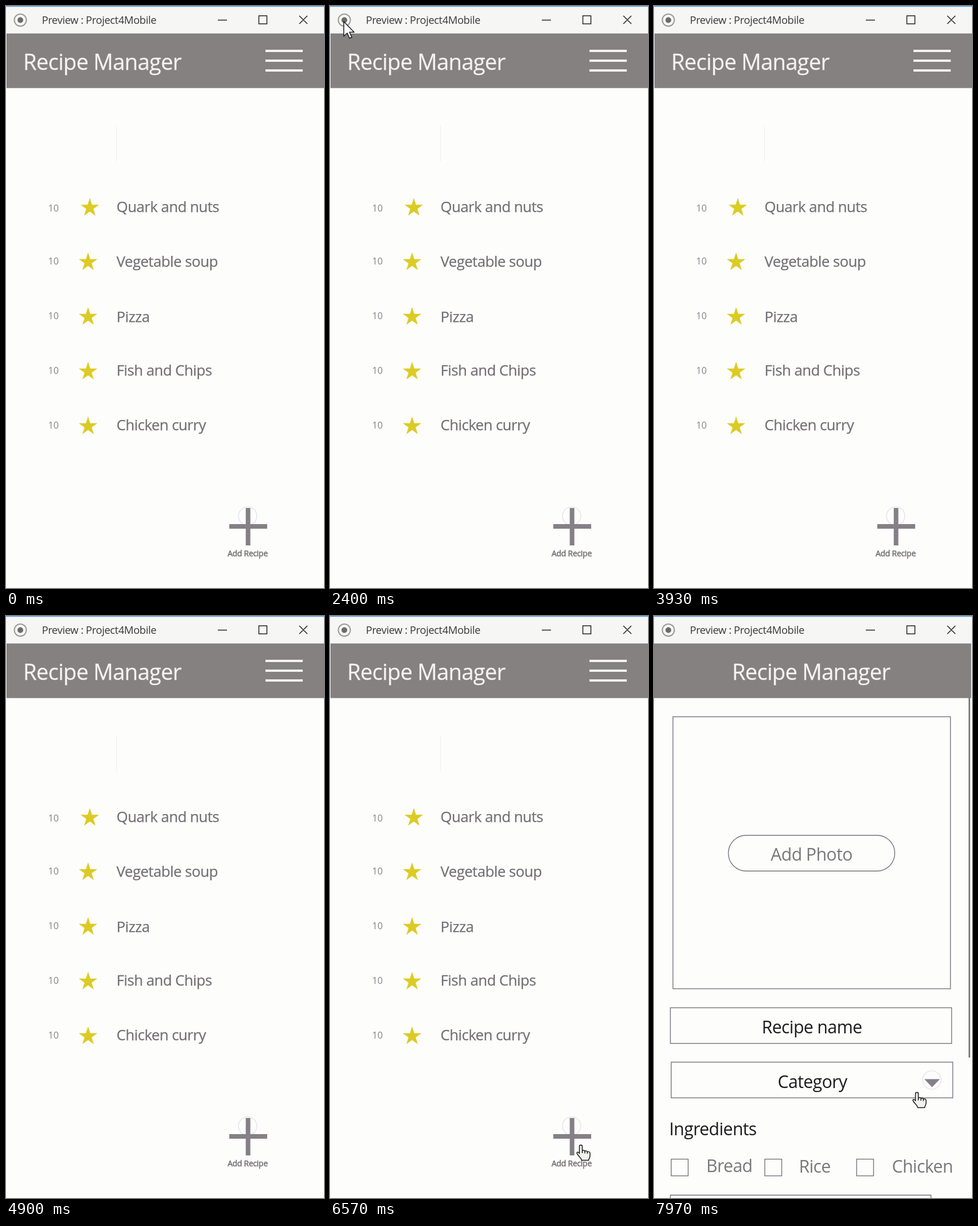
Write an HTML page that moves like this. It is 554 by 1011 pixels and loops after 8000 ms.

```html
<!DOCTYPE html>
<html lang="en">
<head>
<meta charset="utf-8">
<title>Recipe Manager</title>
<style>
  html, body { margin: 0; width: 100%; height: 100%; overflow: hidden; background: #fdfdfb; }
  svg { display: block; width: 554px; height: 1011px; }
  text { font-family: "Open Sans", "Noto Sans", sans-serif; letter-spacing: -.02em; }
  .title { font-size: 38.2px; fill: #f4f3f1; stroke: #f4f3f1; stroke-width: .3; }
  .item { font-size: 25.7px; fill: #737075; stroke: #737075; stroke-width: .25; }
  .count { font-size: 16px; fill: #858186; letter-spacing: 0; }
  .field { font-size: 30.2px; fill: #1c1b1e; }
  .gray { fill: #7a787b; }
  .mid { text-anchor: middle; }
  .bar { fill: #858180; stroke: #7a7683; stroke-width: 1; }
  .box { fill: none; stroke: #77757f; stroke-width: 1.4; }
  .ring { fill: none; stroke: #dfdfea; stroke-width: 1.2; }
  .control { fill: none; stroke: #262626; stroke-width: 1.5; }
</style>
</head>
<body>
<svg viewBox="0 0 554 1011">
  <rect width="554" height="1011" fill="#fdfdfb"/>

  <g id="form">
    <rect class="bar" x="-1" y="48" width="553" height="94"/>
    <rect class="box" x="33" y="175" width="483.5" height="472.5"/>
    <rect class="box" x="129.5" y="381" width="290" height="62" rx="31"/>
    <text class="field gray mid" x="274.5" y="425">Add Photo</text>
    <rect class="box" x="28.5" y="680.5" width="490" height="62"/>
    <text class="field mid" x="275" y="725">Recipe name</text>
    <rect class="box" x="30" y="775" width="490.5" height="62"/>
    <text class="field mid" x="276" y="820">Category</text>
    <circle class="ring" cx="484" cy="806" r="16"/>
    <path d="M471 804.5H498L484.5 818.5Z" fill="#84808a"/>
    <text class="field" x="26.5" y="902">Ingredients</text>
    <g id="checks"></g>
    <path class="box" d="M28.5 1011V1006H482.5V1011"/>
  </g>

  <g id="list">
    <rect class="bar" x="1.5" y="48" width="554" height="94"/>
    <path d="M452 78H517M452 95H517M452 112H517" stroke="#f4f3f1" stroke-width="4"/>
    <path d="M192.5 208V270" stroke="#efeff3"/>
    <g id="rows"></g>
    <g id="plus">
      <circle class="ring" cx="421" cy="886" r="16"/>
      <path d="M421.7 872V937M389 904H455" stroke="#858085" stroke-width="8"/>
    </g>
    <text class="mid" x="421" y="956" font-size="14" fill="#737075" stroke="#737075" stroke-width=".5">Add Recipe</text>
  </g>

  <text id="heading" class="title" y="111">Recipe Manager</text>
  <rect id="scrollbar" x="548" y="142" width="2.8" height="625" fill="#7b7a76"/>

  <g id="window">
    <rect width="554" height="47.5" fill="#f6f6f5"/>
    <rect width="554" height="1.3" fill="#4a9bd4"/>
    <circle cx="25" cy="24.5" r="10.5" fill="none" stroke="#9b9b9b" stroke-width="2"/>
    <circle cx="25" cy="24.5" r="5" fill="#6c6c6c"/>
    <text x="62.5" y="31" font-size="18.3" fill="#39383a">Preview : Project4Mobile</text>
    <path class="control" d="M369 24.5H385M440.5 17H454.5V31H440.5ZM511 17L525 31M525 17L511 31"/>
  </g>

  <g id="cursor" stroke="#1b1b22" stroke-width="1.5" stroke-linejoin="round">
    <path id="arrow" fill="#fff" d="M0 0V25.5L6 20L10 29L14 27.3L10 18.5H18Z"/>
    <path id="hand" fill="#f1f1ee" d="M-2.5 14V2A2.5 2.5 0 0 1 2.5 2V9.5C3.5 8 6.8 8.3 7 10.3C8.2 8.9 11 9.3 11.3 11.3C12.5 10.3 16 10.8 16 13.3V18C16 21.5 14 22.5 13.5 26H1.5C1 22.5 -3 20 -6.5 14.5C-8 12 -5 10 -2.5 14ZM2.5 9.5V13.5M7 10.3V14M11.3 11.3V14.5"/>
  </g>
</svg>
<script>
const LOOP = 8000, SWITCH = 7410, FADE = 180;
const $ = id => document.getElementById(id);

function star(cx, cy, r) {
  const points = [];
  for (let i = 0; i < 10; i++) {
    const a = i * Math.PI / 5, d = i % 2 ? r * 0.382 : r;
    points.push((cx + d * Math.sin(a)).toFixed(2) + "," + (cy - d * Math.cos(a)).toFixed(2));
  }
  return `<polygon points="${points.join(" ")}" fill="#dccb24"/>`;
}

// name, name baseline, count baseline, star centre
$("rows").innerHTML = [
  ["Quark and nuts", 358, 357, 146, 350.5],
  ["Vegetable soup", 453, 449, 143, 445],
  ["Pizza", 549, 544, 143, 540],
  ["Fish and Chips", 642, 639, 143, 635],
  ["Chicken curry", 737, 734, 143, 730]
].map(([name, y, countY, sx, sy]) =>
  `<text class="count" x="73.5" y="${countY}">10</text>${star(sx, sy, 17)}
   <text class="item" x="192.5" y="${y}">${name}</text>`).join("");

$("checks").innerHTML = [
  ["Bread", 30, 91, 966], ["Rice", 193, 252.5, 967], ["Chicken", 353, 414.5, 967]
].map(([name, x, textX, y]) =>
  `<rect class="box" x="${x}" y="943.5" width="29.5" height="29"/>
   <text class="field gray" x="${textX}" y="${y}">${name}</text>`).join("");

// pointer visits: time, x, y
const VISITS = [
  [[2150, -20, 40], [2300, 20, 28], [2400, 24, 27], [2600, 24, 27], [2900, -20, 20]],
  [[5050, 250, -30], [5300, 272, 250], [5500, 318, 625], [5670, 363, 835],
   [5840, 402, 884], [6040, 426, 908], [6340, 437, 919.5], [7420, 437, 920],
   [7500, 425, 912.5], [7600, 426, 900], [7800, 449, 846], [7970, 458, 828], [8000, 458, 828]]
];

function pointerAt(t) {
  for (const path of VISITS) {
    const next = path.findIndex(key => key[0] > t);
    if (next < 1) continue;
    const [t0, x0, y0] = path[next - 1], [t1, x1, y1] = path[next];
    const u = (t - t0) / (t1 - t0);
    return [x0 + (x1 - x0) * u, y0 + (y1 - y0) * u];
  }
  return null;
}

const inside = (x, y, left, top, right, bottom) =>
  x >= left && x <= right && y >= top && y <= bottom;

const show = (id, on) => $(id).setAttribute("visibility", on ? "visible" : "hidden");

function draw(t) {
  const u = Math.min(1, Math.max(0, (t - SWITCH) / FADE));
  const p = 1 - (1 - u) ** 3;
  $("form").setAttribute("opacity", p);
  $("list").setAttribute("opacity", 1 - p);
  $("plus").setAttribute("opacity", (1 - p) ** 2);
  $("heading").setAttribute("x", 30 + 106 * p);
  show("scrollbar", u === 1);

  const pos = pointerAt(t);
  const overLink = pos && (t < SWITCH
    ? inside(...pos, 386, 870, 456, 958)
    : inside(...pos, 30, 775, 520, 837));
  if (pos) $("cursor").setAttribute("transform", `translate(${pos[0]} ${pos[1]})`);
  show("arrow", pos && !overLink);
  show("hand", overLink);
}

const start = performance.now();
function tick() {
  draw((performance.now() - start) % LOOP);
  requestAnimationFrame(tick);
}
tick();
</script>
</body>
</html>
```
